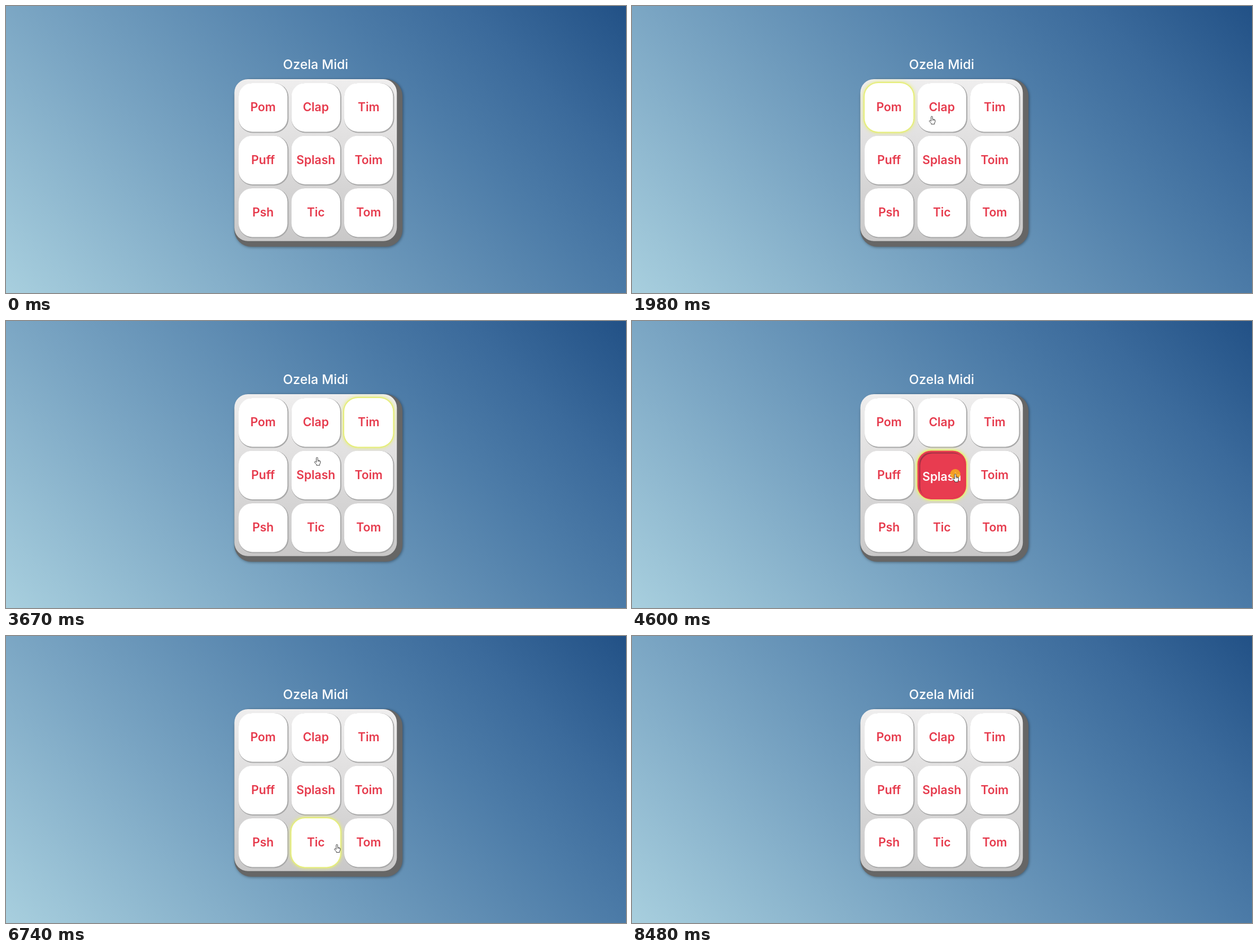
An HTML page with a canvas for the animation above (8550 ms loop, 1098 px wide and 510 px high).

```html
<!DOCTYPE html>
<html lang="en">
<head>
<meta charset="utf-8">
<title>Drum pad</title>
<style>
  html, body { margin: 0; width: 100%; height: 100%; overflow: hidden; }
  canvas { display: block; width: 1098px; height: 510px; }
</style>
</head>
<body>
<canvas id="stage" width="1098" height="510"></canvas>
<script>
const W = 1098, H = 510, LOOP = 8550;
const ctx = document.getElementById('stage').getContext('2d');

const RED = '#e63b4d';
const KEY = 86.4, PITCH = 93.5, RADIUS = 24;
const BOARD = { x: 404.4, y: 130, size: 287.8 };
const LABELS = ['Pom', 'Clap', 'Tim', 'Puff', 'Splash', 'Toim', 'Psh', 'Tic', 'Tom'];
const keys = LABELS.map((label, i) => ({
  label,
  x: 412 + (i % 3) * PITCH,
  y: 137 + Math.floor(i / 3) * PITCH
}));

// One press per key, in order: [down, up]
const PRESSES = [
  [1430, 1630], [2360, 2430], [3130, 3200],
  [4010, 4080], [4600, 4670], [5150, 5220],
  [5900, 5970], [6400, 6470], [7140, 7210]
];
const BLUR_AT = 8480, SHOW_AT = 110, HIDE_AT = 7750;

const linear = u => u;
const smooth = u => u * u * (3 - 2 * u);
const easeOut = u => 1 - (1 - u) ** 2;

// Pointer moves: start, end, steps, target, easing, optional curve control
const MOVES = [
  { a: 110, b: 940, n: 12, to: [503, 224], ease: easeOut, via: [520, 290] },
  { a: 1010, b: 1290, n: 4, to: [482.5, 200], ease: easeOut },
  { a: 1830, b: 2040, n: 3, to: [537, 195.5], ease: easeOut },
  { a: 2630, b: 2910, n: 4, to: [659, 197], ease: smooth },
  { a: 3200, b: 3880, n: 10, to: [492, 267], ease: smooth },
  { a: 4080, b: 4270, n: 3, to: [572.5, 272], ease: smooth },
  { a: 4670, b: 5080, n: 6, to: [630, 275], ease: smooth },
  { a: 5220, b: 5770, n: 8, to: [465, 361.5], ease: smooth },
  { a: 5970, b: 6330, n: 5, to: [540, 366], ease: smooth },
  { a: 6540, b: 6940, n: 6, to: [632, 375], ease: linear },
  { a: 7210, b: 7750, n: 8, to: [990, 490], ease: smooth }
];
const ENTRY = [992, 499];

function pointerAt(t) {
  let from = ENTRY;
  for (const { a, b, n, to, ease, via } of MOVES) {
    if (t < a) return from;
    if (t < b) {
      const u = ease(Math.floor((t - a) / (b - a) * n) / n);
      const mid = via || [(from[0] + to[0]) / 2, (from[1] + to[1]) / 2];
      return from.map((p, i) =>
        (1 - u) ** 2 * p + 2 * u * (1 - u) * mid[i] + u * u * to[i]);
    }
    from = to;
  }
  return from;
}

function box(x, y, w, h, r, fill) {
  ctx.beginPath();
  ctx.roundRect(x, y, w, h, r);
  ctx.fillStyle = fill;
  ctx.fill();
}

function glow(color, blur, paint, dx = 0, dy = 0) {
  ctx.save();
  ctx.shadowColor = color;
  ctx.shadowBlur = blur;
  ctx.shadowOffsetX = dx;
  ctx.shadowOffsetY = dy;
  paint();
  ctx.restore();
}

function gradient(x0, y0, x1, y1, stops) {
  const g = ctx.createLinearGradient(x0, y0, x1, y1);
  stops.forEach(([at, color]) => g.addColorStop(at, color));
  return g;
}

// 45 degree gradient running corner to corner
const reach = (W + H) / 4;
const sky = gradient(W / 2 - reach, H / 2 + reach, W / 2 + reach, H / 2 - reach, [
  [0, '#a8cfde'], [0.33, '#7aa5c3'], [0.67, '#4d7ca8'], [0.82, '#3b6a9b'], [1, '#225186']
]);
const metal = gradient(0, BOARD.y, 0, BOARD.y + BOARD.size, [[0, '#efeeee'], [1, '#c9c8c8']]);

function text(str, x, y, font, color) {
  ctx.font = font + ' Inter, sans-serif';
  ctx.textAlign = 'center';
  ctx.fillStyle = color;
  ctx.fillText(str, x, y);
}

function drawBoard() {
  const { x, y, size } = BOARD;
  glow('rgba(0,0,0,.4)', 5, () => box(x, y, size + 10, size + 10, 30, '#666'), 1, 1);
  box(x, y, size, size, RADIUS, metal);
}

function drawKey({ label, x, y }, focused, pressed) {
  if (focused) {
    glow('#e8f070', 6, () => box(x - 2, y - 2, KEY + 4, KEY + 4, RADIUS + 2, '#e6ee7c'));
  } else {
    box(x, y, KEY + 2, KEY + 2, RADIUS + 1, '#a9a9a9');
  }
  box(x, y, KEY, KEY, RADIUS, pressed ? '#e83c50' : '#fff');
  if (pressed) {
    const inner = KEY - 6;
    ctx.save();
    box(x + 3, y + 3, inner, inner, RADIUS - 3, '#a53144');
    ctx.clip();
    box(x + 5, y + 5, inner, inner, RADIUS - 3, '#e83c50');
    ctx.restore();
  }
  text(label, x + KEY / 2, y + (pressed ? 53.3 : 50.3), '600 21px', pressed ? '#fff' : RED);
}

const ARROW = new Path2D('M0 0V10.2L2.4 8L4 11.4L5.6 10.7L4.1 7.4H7.3Z');
const HAND = new Path2D(
  'M-1.3 1.2Q-1.2 0 0 0Q1.2 0 1.3 1.2V5L4.6 5.8Q6 6.2 6 7.6V9.6L4.8 12V14H-1V12.4' +
  'L-4.2 9.2Q-4.8 8.2-4 7.6Q-3.2 7.2-2.4 7.8L-1.3 8.8Z');

function drawPointer([x, y], clicking) {
  if (clicking) {
    ctx.beginPath();
    ctx.arc(x, y, 9, 0, Math.PI * 2);
    ctx.fillStyle = 'rgba(244,170,30,.88)';
    ctx.fill();
  }
  const overKey = keys.some(k => x > k.x && x < k.x + KEY && y > k.y && y < k.y + KEY);
  const shape = overKey ? HAND : ARROW;
  ctx.save();
  ctx.translate(x, y);
  ctx.fillStyle = '#fff';
  ctx.strokeStyle = '#333';
  ctx.lineWidth = 0.9;
  ctx.lineJoin = 'round';
  ctx.fill(shape);
  ctx.stroke(shape);
  if (overKey) {
    ctx.lineWidth = 0.6;
    ctx.beginPath();
    for (const lx of [1.3, 2.9, 4.4]) {
      ctx.moveTo(lx, 5.4);
      ctx.lineTo(lx, 7.8);
    }
    ctx.stroke();
  }
  ctx.restore();
}

function draw(t) {
  const focus = t < BLUR_AT ? PRESSES.filter(p => t >= p[0]).length - 1 : -1;
  const pressed = focus >= 0 && t < PRESSES[focus][1];

  ctx.fillStyle = sky;
  ctx.fillRect(0, 0, W, H);
  text('Ozela Midi', 548.3, 112, '500 23px', '#fff');
  drawBoard();
  keys.forEach((key, i) => drawKey(key, i === focus, i === focus && pressed));
  if (t >= SHOW_AT && t < HIDE_AT) drawPointer(pointerAt(t), pressed);
}

const start = performance.now();
function tick() {
  draw((performance.now() - start) % LOOP);
  requestAnimationFrame(tick);
}
tick();
</script>
</body>
</html>
```
